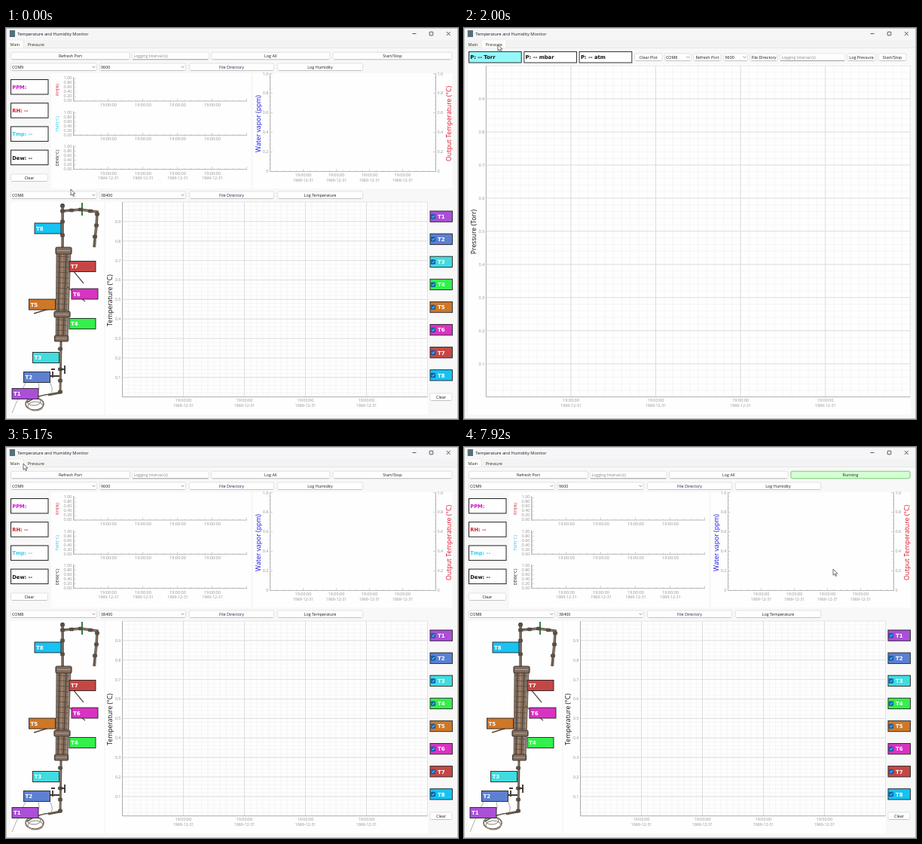
Recreate the animation shown at these times as an HTML page. Size 600 by 519 pixels, loop 8000 ms.

```html
<!DOCTYPE html>
<html lang="en">
<head>
<meta charset="utf-8">
<title>Temperature and Humidity Monitor</title>
<style>
html, body { margin: 0; width: 100%; height: 100%; overflow: hidden; background: #f8f8f8; }
svg { display: block; width: 100vw; height: 100vh; }
text { font-family: "Open Sans", "Noto Sans", sans-serif; white-space: pre; }
.bold { font-family: "DejaVu Sans", sans-serif; font-weight: bold; }
</style>
</head>
<body>
<svg id="stage" viewBox="0 0 600 519" xmlns="http://www.w3.org/2000/svg"></svg>
<script>
const LOOP = 8000, STEP = 1000 / 12;
const GREY = '#929292', INK = '#1c1c1c';
const range = (n, f) => Array.from({ length: n }, (_, i) => f(i)).join('');

// y is the vertical middle of the text
function text(x, y, s, { size = 5.4, fill = INK, anchor = 'start', bold = false, turn = false } = {}) {
  const place = turn ? `transform="translate(${x} ${y}) rotate(-90)" y="${size * .36}"` : `x="${x}" y="${y + size * .36}"`;
  return `<text ${place} font-size="${size}" fill="${fill}" text-anchor="${anchor}"${bold ? ' class="bold"' : ''}>${s}</text>`;
}
const mid = (x, y, s, o) => text(x, y, s, { anchor: 'middle', ...o });
const title = (x, y, s, fill = '#111', size = 8.7) => mid(x, y, s, { fill, size, turn: true });
const rect = (x, y, w, h, fill, stroke = 'none', sw = 1, r = 0) =>
  `<rect x="${x}" y="${y}" width="${w}" height="${h}" rx="${r}" fill="${fill}" stroke="${stroke}" stroke-width="${sw}"/>`;
const path = (d, stroke, w = 1, fill = 'none', extra = '') =>
  `<path d="${d}" stroke="${stroke}" stroke-width="${w}" fill="${fill}" ${extra}/>`;
const group = (id, body) => `<g id="${id}">${body}</g>`;

function button(x, y, w, s, { fill = '#fefefe', stroke = '#dadada', ink = INK } = {}) {
  return rect(x + .4, y + .4, w - .8, 9.6, fill, stroke, .8, 1.6) +
    (stroke === '#dadada' ? path(`M${x + 2} ${y + 10}H${x + w - 2}`, '#bcbcbc', .8) : '') +
    mid(x + w / 2, y + 5.3, s, { fill: ink });
}
function combo(x, y, w, s, lit) {
  return rect(x + .4, y + .4, w - .8, 9.6, lit ? '#d5e8f6' : '#fefefe', lit ? '#3a93cf' : '#dadada', .8, 1.6) +
    (lit ? '' : path(`M${x + 2} ${y + 10}H${x + w - 2}`, '#bcbcbc', .8)) +
    text(x + 2, y + 5.3, s) + path(`M${x + w - 6.6} ${y + 4.2}l2 2l2 -2`, '#666', .7);
}
const field = (x, y, w) =>
  rect(x + .4, y + .4, w - .8, 9.6, '#fefefe', '#e2e2e2', .8, 1.4) +
  path(`M${x + 1} ${y + 10}H${x + w - 1}`, '#8c8c8c', .8) +
  text(x + 2.5, y + 5.3, 'Logging Interval (s)', { size: 5.2, fill: '#858585' });

const stamp = (x, y, date = true) => mid(x, y, '19:00:00', { fill: GREY, size: 5.5 }) +
  (date ? mid(x, y + 6.6, '1969-12-31', { fill: GREY, size: 5.3 }) : '');

// Ticks of one axis: a long one at every fifth step
function ticks(x, y, dx, dy, n, tx, ty) {
  return path(range(n + 1, i => {
    const k = i % 5 ? 1.6 : 3.4;
    return `M${x + dx * i} ${y + dy * i}l${tx * k} ${ty * k}`;
  }), '#b4b4b4', .6);
}

function gridPlot(x, y, w, h) {
  const lines = (nx, ny) => range(nx - 1, i => `M${x + w * (i + 1) / nx} ${y}v${h}`) +
    range(ny - 1, i => `M${x} ${y + h * (i + 1) / ny}h${w}`);
  return path(lines(50, 50), '#f2f2f3', .7) + path(lines(5, 10), '#dcdcdc', .9) +
    path(`M${x} ${y}h${w}v${h}`, '#dedede', .8) +
    path(`M${x} ${y}v${h}h${w}`, '#a3a3a3', .9) +
    range(9, i => text(x - 2, y + h * (i + 1) / 10, (.9 - i / 10).toFixed(1), { size: 5.5, fill: GREY, anchor: 'end' })) +
    range(4, i => stamp(x + w * (i + 1) / 5, y + h + 4.3));
}

function smallPlot(i, name, fill) {
  const base = 97 + i * 45.3, left = 89.5;
  return path(`M${left} ${base - 32}V${base}H320`, '#a3a3a3', .8) +
    ticks(left, base, 9.2, 0, 25, 0, -1) +
    ticks(left, base, 0, -1.2, 25, 1, 0) +
    range(6, k => text(87.5, base - .6 - k * 6, (k / 5).toFixed(2), { size: 5.5, fill: GREY, anchor: 'end' })) +
    range(4, k => stamp(136 + k * 46, base + 5.2, i === 2)) +
    title(67.5, base - 15, name, fill, 5.7);
}

function vaporPlot() {
  const y = k => 190.3 - k * 26;
  return path('M350.5 60V190.5H570.5V60', '#a3a3a3', .8) +
    ticks(350.5, 190.5, 8.8, 0, 25, 0, -1) +
    ticks(350.5, 190.5, 0, -5.2, 25, 1, 0) +
    ticks(570.5, 190.5, 0, -5.2, 25, -1, 0) +
    range(6, k => {
      const s = k === 5 ? '1.0' : k ? (k / 5).toFixed(1) : '0', yy = Math.max(y(k), 61.5);
      return text(348.5, yy, s, { size: 5.5, fill: GREY, anchor: 'end' }) + text(572.5, yy, s, { size: 5.5, fill: GREY });
    }) +
    range(4, k => stamp(394.5 + k * 44, 195)) +
    title(334.5, 127, 'Water vapor (ppm)', '#1414e6') +
    title(588, 127, 'Output Temperature (°C)', '#dc1428');
}

const COLORS = ['#ab4fd9', '#5d80d2', '#40dcdf', '#33f04c', '#cd7728', '#da32c2', '#c54745', '#16c3f2'];
const TAGS = [[8, 478.5], [23.5, 456.5], [35.5, 430.5], [84, 385.5], [30.5, 360], [87, 346], [84, 309.5], [38, 259]];

function apparatus() {
  const pipe = '#65594c', dark = '#433b36';
  const joints = [[75, 236], [75, 243], [75, 257], [75, 275], [87, 242], [99, 241], [112, 243], [121, 247], [120, 262], [118, 277], [72, 426], [72, 453], [72, 468], [72, 483]];
  return rect(6, 231, 124, 282, '#fefefe') +
    path('M75 233V291M75 243L99 241L121 244L120 262L117 291', pipe, 3.6) +
    path('M74.2 234V290M76 244L99 241L120 244L119 290', '#a08e7b', .9) +
    path('M101 232V249', '#35813f', 2) +
    path('M73 416L72 484L56 487', pipe, 3) +
    path('M72 418V484', '#a18f79', .8) +
    joints.map(([x, y]) => rect(x - 2.6, y - 2, 5.2, 4, '#5b5148', dark, .6, 1)).join('') +
    path('M67 296L86 296L82 412L66 412Z', '#62564f', .8, '#85705f') +
    path('M71 298L69 410M80 298L76 411', '#4f4641', 1.3) +
    path('M75 298L72 410', '#b28669', 1.7) +
    path('M84 298L80 410', '#a89989', 1) +
    path(range(16, i => `M${68 - i * .1} ${303 + i * 7}l${16 - i * .15} 1`), '#514740', .7) +
    [[66, 291, 21, 9], [64, 376, 21, 8], [64.5, 408, 18, 8]].map(([x, y, w, h]) => rect(x, y, w, h, '#806c5e', dark, 1.2, 2) +
      path(`M${x + 2} ${y + h / 2}h${w - 4}`, '#b7a38e', 1)).join('') +
    path('M84 316L103 339M81 343L105 363', '#5f554e', 1.3) +
    path('M37 379L63 371', '#60462f', 1.6) +
    path('M62 456V464M58 462H71M72 453H79M78 448V459M60 453H65', dark, 1.9) +
    path('M59 464Q52 466 59 472Q64 482 58 486', '#9c9c98', .9) +
    path('M26 471Q18 486 8 511M43 470Q48 487 29 491', '#9b9894', .8) +
    '<g fill="none"><ellipse cx="38" cy="499" rx="12" ry="8" stroke="#6f665e" stroke-width="1.5"/>' +
    '<ellipse cx="39" cy="502" rx="10" ry="6" stroke="#9a8a7c" stroke-width="1.2"/>' +
    '<ellipse cx="37" cy="496" rx="9" ry="5" stroke="#857b72"/></g>' +
    path('M28 497Q44 486 61 486', '#625850', 1.6) +
    TAGS.map(([x, y], i) => rect(x, y, 35, 14, COLORS[i], '#222', .9) +
      text(x + 2, y + 7.3, 'T' + (i + 1), { size: 7, fill: '#fff', bold: true })).join('');
}

const legend = () => COLORS.map((c, i) => {
  const y = 243 + i * 30.1;
  return rect(563, y, 29.5, 14.3, c, '#222', .9) + rect(564, y + 4.4, 5.8, 5.8, '#0865b8', '#07508f', .5, 1) +
    path(`M565.3 ${y + 7.3}l1.3 1.3l2 -2.7`, '#fff', .7) +
    text(573, y + 7.4, 'T' + (i + 1), { size: 7, fill: '#fff', bold: true });
}).join('');

function mainPage() {
  const boxes = [['PPM:', '#cf14c8'], ['RH: --', '#c81d2b'], ['Tmp: --', '#32c8f0'], ['Dew: --', '#111']];
  const link = { ink: '#20205c' };
  return button(6, 31.8, 159, 'Refresh Port') + field(167, 31.8, 102.5) + button(272, 31.8, 158.5, 'Log All') +
    group('start', button(433.5, 31.8, 159, 'Start/Stop')) +
    group('hover', button(433.5, 31.8, 159, 'Start/Stop', { fill: '#dfeef8', stroke: '#4d9dcb' })) +
    group('running', button(433.5, 31.8, 159, 'Running', { fill: '#d3ffd1', stroke: '#5dbd5b' })) +
    combo(6, 46.5, 115, 'COM9') + combo(124, 46.5, 115, '9600') +
    button(243, 46.5, 113, 'File Directory', link) + button(360, 46.5, 114, 'Log Humidity') +
    rect(60, 60, 265, 153, '#fefefe') + rect(328, 60, 264.5, 153, '#fefefe') +
    boxes.map(([s, fill], i) => rect(6.5, 68.5 + i * 31.2, 49.5, 19.5, '#fefefe', '#222', 1) +
      text(8.3, 78.6 + i * 31.2, s, { size: 6.7, fill, bold: true })).join('') +
    button(6, 193.5, 50, 'Clear') +
    smallPlot(0, 'RH(%)', '#d2283c') + smallPlot(1, 'TMP(°C)', '#32c8e6') + smallPlot(2, 'DEW(°C)', '#222') +
    vaporPlot() +
    group('port', combo(6, 216.5, 115, 'COM8')) + group('portLit', combo(6, 216.5, 115, 'COM8', true)) +
    combo(124, 216.5, 115, '38400') +
    button(243, 216.5, 113, 'File Directory', link) + button(360, 216.5, 114, 'Log Temperature') +
    apparatus() + rect(132, 231, 428, 282, '#fefefe') + gridPlot(154.5, 231, 405, 258.7) +
    title(138, 361.5, 'Temperature (°C)') + legend() + button(562.5, 484.5, 30, 'Clear');
}

function pressurePage() {
  const units = ['Torr', 'mbar', 'atm'];
  return rect(6, 48, 587, 465, '#fefefe') +
    units.map((u, i) => rect(6.5 + i * 73.3, 31.5, 69.7, 14.5, i ? '#fefefe' : '#93f8fa', '#333', 1) +
      text(8.3 + i * 73.3, 39, `P: -- ${u}`, { size: 6.8, fill: '#111', bold: true })).join('') +
    button(226, 33.5, 37.5, 'Clear Plot') +
    group('portP', combo(266, 33.5, 36, 'COM8')) + group('portPLit', combo(266, 33.5, 36, 'COM8', true)) +
    button(304.5, 33.5, 37, 'Refresh Port') + combo(344.5, 33.5, 32.5, '9600') +
    button(379.5, 33.5, 37, 'File Directory') + field(419, 33.5, 87) +
    button(508.5, 33.5, 38, 'Log Pressure') + button(549.5, 33.5, 38, 'Start/Stop') +
    gridPlot(29.3, 50, 563, 439.7) + title(12.5, 270.5, 'Pressure (Torr)') +
    group('popup', rect(268, 46, 33, 24, '#fdfdfd') + path('M301.7 46V71.2H270', '#858585', 1.2));
}

document.getElementById('stage').innerHTML =
  rect(0, 0, 600, 519, '#f8f8f8') + rect(0, 0, 600, 15.5, '#f6f6f8') +
  rect(4.8, 3, 7.2, 9, '#55707c') +
  text(15.3, 7.6, 'Temperature and Humidity Monitor', { size: 5.7 }) +
  path('M539.5 7.5h5M584.8 5l5 5M589.8 5l-5 5', '#333', .8) + rect(562.2, 5.2, 4.6, 4.6, 'none', '#333', .8, .6) +
  rect(1, 16, 598, 10.3, '#f3f3f3') + path('M1 26.4H599', '#e5e5e5', .8) +
  group('tabMain', rect(1, 16, 22, 10.8, '#fdfdfd', '#e3e3e3', .6)) +
  group('tabPressure', rect(23, 16, 33, 10.8, '#fdfdfd', '#e3e3e3', .6)) +
  mid(11.8, 21.6, 'Main', { fill: '#22300f' }) + mid(39.8, 21.6, 'Pressure', { fill: '#22300f' }) +
  group('main', mainPage()) + group('pressure', pressurePage()) +
  rect(.4, .4, 599.2, 518.2, 'none', '#b4b4b4', .8) +
  group('cursor', path('M0 0V8.2L1.9 6.5L3.2 9.5L4.6 8.9L3.3 6H5.8Z', '#333', .7, '#fff', 'stroke-linejoin="round"'));

// time, x, y of the pointer tip
const MOVES = [
  [0, 86, 214], [420, 80, 221], [920, 80, 221], [1420, 41, 55], [1830, 45, 22], [2500, 45, 22],
  [3420, 284, 39], [3660, 284, 39], [3830, 291, 57.5], [4170, 289, 50], [4750, 14, 21], [5000, 14, 21],
  [5170, 23, 22], [6000, 466, 33], [6330, 500, 36], [6900, 500, 36], [7920, 490, 162], [LOOP, 490, 162]
];

function pointer(t) {
  const i = MOVES.findIndex(m => m[0] > t);
  const [t0, x0, y0] = MOVES[i - 1], [t1, x1, y1] = MOVES[i];
  const p = (t - t0) / (t1 - t0), e = p * p * (3 - 2 * p);
  return [x0 + (x1 - x0) * e, y0 + (y1 - y0) * e];
}

const show = (id, on) => { document.getElementById(id).style.display = on ? '' : 'none'; };

function draw(time) {
  const t = Math.floor((time % LOOP + 5) / STEP) % 96 * STEP + 4;
  const within = (a, b) => t >= a && t < b;
  const pressure = within(1900, 4830), lit = within(480, 1900), litP = within(3450, 4200);
  const running = t >= 6580, hover = within(5900, 6580);
  show('pressure', pressure);
  show('tabPressure', pressure);
  show('main', !pressure);
  show('tabMain', !pressure);
  show('portLit', lit);
  show('port', !lit);
  show('portPLit', litP);
  show('portP', !litP);
  show('popup', within(3740, 4000));
  show('running', running);
  show('hover', hover);
  show('start', !running && !hover);
  const [x, y] = pointer(t);
  document.getElementById('cursor').setAttribute('transform', `translate(${x.toFixed(2)} ${y.toFixed(2)})`);
}

const begin = performance.now();
function tick() {
  draw(performance.now() - begin);
  requestAnimationFrame(tick);
}
tick();
</script>
</body>
</html>
```
